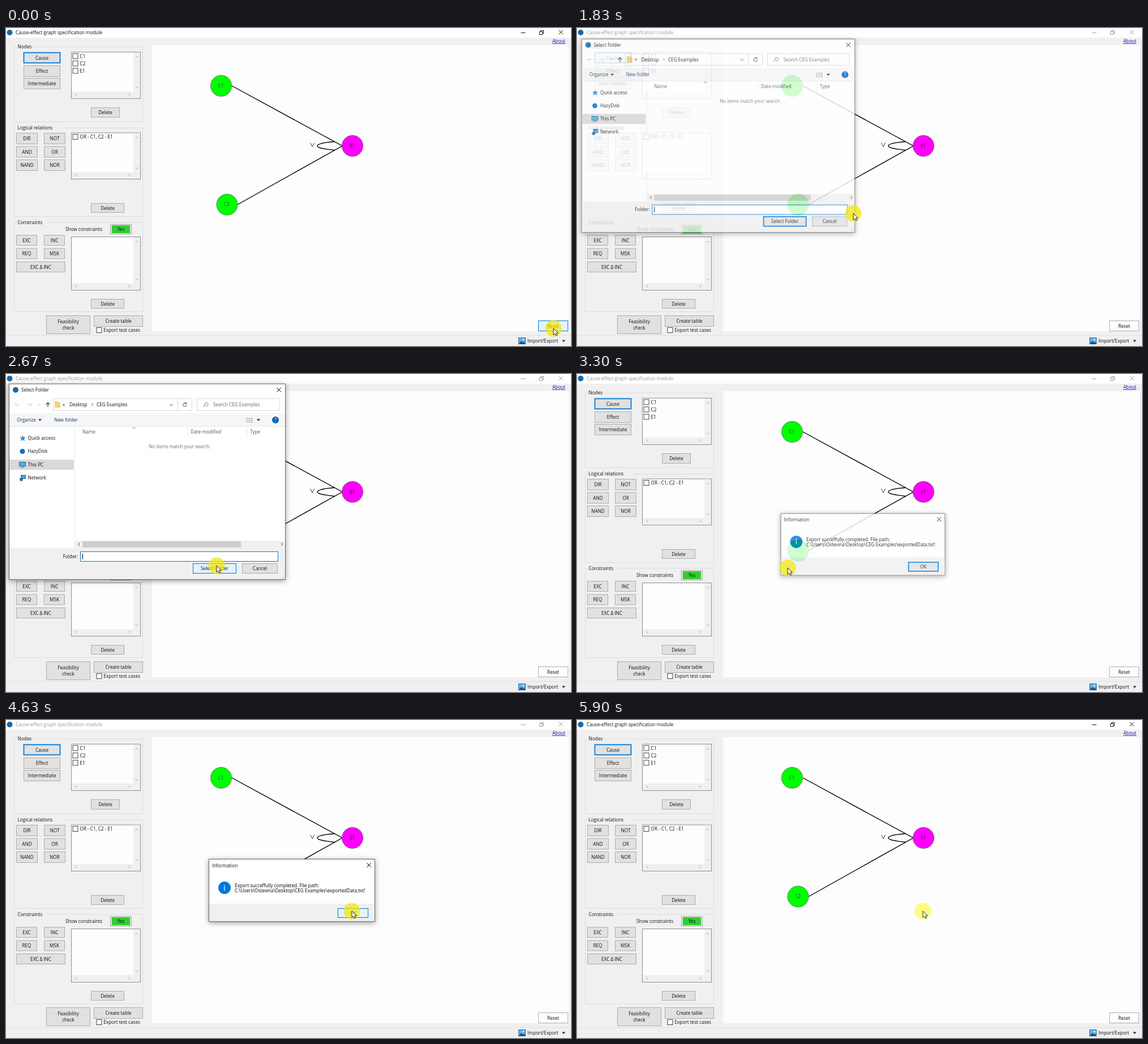
An HTML page that plays this animation: 998 px wide and 561 px high, repeating every 5.96 s.

```html
<!DOCTYPE html>
<html lang="en">
<head>
<meta charset="utf-8">
<title>Cause-effect graph specification module</title>
<style>
html, body { margin: 0; width: 100%; height: 100%; overflow: hidden; background: #f0f0f0; }
svg { display: block; width: 998px; height: 561px; }
text { font: 8.2px "Open Sans", "Noto Sans", sans-serif; white-space: pre; }
.window { transform-box: fill-box; transform-origin: center; filter: drop-shadow(0 2px 5px #0006); }
.button rect { fill: #e1e1e1; stroke: #adadad; }
.button.default rect { stroke: #0078d7; stroke-width: 1.8; }
.button.plain rect { fill: #fdfdfd; }
.button.hover rect { fill: #e5f1fb; stroke: #0078d7; stroke-width: 1; }
.item rect { fill: #f2f2f2; }
.item.hover rect { fill: #0078d7; }
.item.hover text { fill: #fff; }
</style>
</head>
<body>
<svg id="stage" viewBox="0 0 998 561"></svg>
<script>
const LOOP = 5960;
const BLUE = '#0078d7';

// Drawing helpers; boxes are given by their outer corners, text by its middle line.
const rect = (x1, y1, x2, y2, fill, stroke = 'none') => {
  const inset = stroke === 'none' ? 0 : 0.5;
  return `<rect x="${x1 + inset}" y="${y1 + inset}" width="${x2 - x1 - 2 * inset}" height="${y2 - y1 - 2 * inset}" fill="${fill}" stroke="${stroke}"/>`;
};
const text = (x, y, s, fill = '#111', anchor = 'start', extra = '') =>
  `<text x="${x}" y="${y + 3}" fill="${fill}" text-anchor="${anchor}" ${extra}>${s}</text>`;
const line = (d, stroke = '#333', width = 1) =>
  `<path d="${d}" fill="none" stroke="${stroke}" stroke-width="${width}"/>`;
const shape = (d, fill) => `<path d="${d}" fill="${fill}"/>`;
const circle = (x, y, r, fill, stroke = 'none') =>
  `<circle cx="${x}" cy="${y}" r="${r}" fill="${fill}" stroke="${stroke}" stroke-width=".7"/>`;
const group = (id, content, cls = '') => `<g id="${id}" class="${cls}">${content}</g>`;

const button = (x1, y1, x2, y2, label, cls = '', id = '') => {
  const lines = label.split('|');
  const middle = (y1 + y2) / 2 - (lines.length - 1) * 5.5;
  return group(id, rect(x1, y1, x2, y2, '#e1e1e1', '#adadad') +
    lines.map((s, i) => text((x1 + x2) / 2, middle + i * 11, s, '#111', 'middle')).join(''), 'button ' + cls);
};
const chevron = (x, y, dx, dy, size = 2.5, color = '#aaa') => line(dx
  ? `M${x - dx} ${y - size}l${2 * dx} ${size}l${-2 * dx} ${size}`
  : `M${x - size} ${y - dy}l${size} ${2 * dy}l${size} ${-2 * dy}`, color);
const dropArrow = (x, y, color = '#222') => shape(`M${x - 3} ${y - 1.5}h6l-3 3.5z`, color);
const closeMark = (x, y) => line(`M${x - 3.7} ${y - 3.7}l7.4 7.4m0-7.4l-7.4 7.4`, 'currentColor');
const checkItem = (x, y, label) =>
  rect(x, y - 5, x + 10, y + 5, '#fff', '#444') + text(x + 13, y, label);
const listBox = (y1, y2, items = []) =>
  rect(115, y1, 238, y2, '#fdfdfd', '#8b9098') +
  rect(225, y1 + 1, 237, y2 - 1, '#f0f0f0') + rect(116, y2 - 13, 237, y2 - 1, '#f0f0f0') +
  chevron(231, y1 + 9, 0, -1.3) + chevron(231, y2 - 20, 0, 1.3) +
  chevron(124, y2 - 7.5, -1.2, 0) + chevron(218, y2 - 7.5, 1.2, 0) +
  items.map((s, i) => checkItem(117.5, y1 + 7.5 + i * 13, s)).join('');
const groupBox = (y1, y2, label) =>
  rect(14, y1, 242, y2, 'none', '#dedee0') + rect(19, y1 - 4, 23 + label.length * 4.5, y1 + 5, '#f0f0f0') +
  text(20.5, y1, label);
const graphNode = (x, y, label, fill, ink) =>
  circle(x, y, 18.6, fill, '#555') + text(x - .5, y - .5, label, ink, 'middle');

const mainWindow = [
  rect(0, 0, 998, 561, '#f0f0f0'),
  rect(0, 0, 998, 17, '#fff'),
  circle(6.5, 8, 5, '#1769a5'),
  group('titleBar', text(17, 8.3, 'Cause-effect graph specification module', 'currentColor') +
    line('M909.5 8.5h8M942.5 6.5h5v5h-5zM944.5 6v-1.500h5v5h-2', 'currentColor') + closeMark(980, 7.5)),
  text(988, 23, 'About', '#1010c0', 'end', 'text-decoration="underline"'),
  rect(258, 30, 994, 535, '#fdfdfd'),

  groupBox(33, 166, 'Nodes'),
  button(31, 43, 96, 62, 'Cause', 'default'),
  button(31, 66, 96, 86, 'Effect'),
  button(31, 88, 96, 108, 'Intermediate'),
  listBox(42, 125, ['C1', 'C2', 'E1']),
  button(150, 140, 201, 158, 'Delete'),

  groupBox(176, 333, 'Logical relations'),
  ...['DIR', 'NOT', 'AND', 'OR', 'NAND', 'NOR'].map((s, i) => {
    const x = i % 2 ? 67 : 18, y = 185 + (i >> 1) * 23.5;
    return button(x, y, x + 38, y + 20, s);
  }),
  listBox(184.500, 267, ['OR - C1, C2 - E1']),
  button(150, 309, 209, 326, 'Delete'),

  groupBox(342.5, 501, 'Constraints'),
  text(105, 355, 'Show constraints'),
  rect(184, 346, 222, 364, '#e1e1e1', '#adadad') + rect(187, 348, 219, 362, '#32cd32'),
  text(203, 355, 'Yes', '#111', 'middle'),
  ...['EXC', 'INC', 'REQ', 'MSK'].map((s, i) => {
    const x = i % 2 ? 67 : 18, y = 365 + (i >> 1) * 23.5;
    return button(x, y, x + 37, y + 19, s);
  }),
  button(18, 412, 105, 431, 'EXC Δ INC'),
  listBox(368, 463),
  button(150, 478, 209, 495, 'Delete'),
  button(71, 507, 149, 540, 'Feasibility|check'),
  button(155, 507, 242, 527, 'Create table'),
  checkItem(159.5, 533, 'Export test cases'),

  line('M399 102L594 208L409 311.500', '#000', 1.4),
  line('M580 200.500C562 202 550 204.500 550 208S562 213.500 580 215.500', '#000', 1.4),
  line('M537.5 202.500l3.500 7l3.500-7', '#222', .9),
  graphNode(380, 102, 'C1', '#0f0', '#063'),
  graphNode(390.5, 311.5, 'C2', '#0f0', '#063'),
  graphNode(612, 208, 'E1', '#f0f', '#505'),

  button(940, 516, 993, 535, 'Reset', 'plain', 'reset'),
  line('M0 542.500H998', '#e0e0e4'),
  group('arrowGlow', rect(981, 544, 989, 560, '#bfe0fa', '#8cc4ee')),
  rect(905, 546, 918, 558, '#5db5ee', '#356b96'),
  shape('M906 557l4-5l3 3l2-2l2 4z', '#174f7a') + circle(914, 549.5, 1.3, '#fff'),
  text(921, 552, 'Import/Export'),
  dropArrow(985, 552)
].join('');

const menu = rect(903, 509.5, 985, 544, '#f2f2f2', '#aaa') +
  group('importItem', rect(904, 511, 984, 527, '') + text(942, 518.5, 'Import', '#111', 'middle'), 'item') +
  group('exportItem', rect(904, 527, 984, 543, '') + text(942, 535, 'Export', '#111', 'middle'), 'item');

const folderWindow = [
  rect(5, 17, 494, 363, '#fff', '#6a6a6a'),
  circle(17, 28, 5, '#1769a5'),
  text(27, 28, 'Select Folder') + closeMark(482, 28),
  line('M24 54h-8m3-3l-3 3l3 3M37 54h8m-3-3l3 3l-3 3', '#ccc'),
  chevron(59, 54, 0, 1, 2, '#bbb'),
  line('M74 58.500v-8m-3.500 3.500l3.500-3.500l3.500 3.500', '#444', 1.2),
  rect(83, 43, 329, 65, '#fff', '#d9d9d9') + line('M303.5 43v22', '#d9d9d9'),
  shape('M86 48h5l1 1.500h4v10h-10z', '#f7d36b'),
  text(100, 53.5, '«') + text(112, 54, 'Desktop') + chevron(152.5, 54, 1, 0, 2, '#444') + text(160, 54, 'CEG Examples'),
  chevron(292, 54.5, 0, 1.5, 3, '#555'),
  line('M318 51.800a3.200 3.200 0 1 0 1.200 2.500M318.500 49.500v2.800h-2.800', '#444'),
  rect(337, 43, 484, 65, '#fff', '#d9d9d9'),
  line('M348.500 58l2.800-3a3 3 0 1 1 1 1', '#777'),
  text(366, 54, 'Search CEG Examples', '#666'),
  rect(6, 69, 493, 93, '#f5f6f7') + line('M6 92.500H493', '#e8e8ea'),
  text(19, 81, 'Organize', '#1e395b') + dropArrow(60, 81, '#1e395b') + text(85, 81, 'New folder', '#1e395b'),
  line('M424 78.500h3m1 0h3m1 0h4M424 81.500h3m1 0h3m1 0h4M424 84.500h3m1 0h3m1 0h4', '#889'),
  dropArrow(446, 81),
  circle(476, 81, 6, '#0b63b0') + text(476, 81, '?', '#fff', 'middle', 'font-weight="700"'),

  rect(6, 151, 120, 169, '#d9d9d9') + line('M121.500 93V307', '#efefef'),
  shape('M29.500 108l1.500 3.500l4 .3l-3 2.500l1 4l-3.500-2.200l-3.500 2.200l1-4l-3-2.500l4-.3z', '#2f8fdc'),
  circle(29, 136.5, 4.5, '#0a6fc8'),
  rect(23, 155, 35, 163, '#42b4ee', '#24668f') + line('M26 164.500h6', '#24668f'),
  rect(26, 178, 35, 185, '#42a5e5', '#24668f') + circle(27, 186, 3, '#3273a8'),
  ...['Quick access', 'HazyDisk', 'This PC', 'Network'].map((s, i) => text(38.5, 113 + i * 23.4, s)),

  text(135, 102, 'Name', '#555') + text(326, 102, 'Date modified', '#555') + text(431, 102, 'Type', '#555'),
  chevron(226, 95, 0, -1.3, 2.7, '#777') + line('M320.500 94v16M426.500 94v16', '#e8e8e8'),
  text(252, 128, 'No items match your search.', '#6d6d6d'),
  rect(122, 294, 493, 307, '#f0f0f0') + rect(135, 295, 415, 306, '#cdcdcd'),
  chevron(129, 300.5, -1.2, 0, 2.5, '#333') + chevron(487.5, 300.5, 1.2, 0, 2.5, '#333'),
  rect(6, 307, 493, 362, '#f0f0f0'),
  text(127, 322, 'Folder:', '#111', 'end'),
  rect(131, 313, 481, 331, '#fff', BLUE) + line('M135.500 317v10', '#000'),
  button(330, 334, 407, 352, 'Select Folder', 'default', 'select'),
  button(417, 334, 480, 352, 'Cancel'),
  line('M486 359.500h1m1.500 0h1m1.500 0h1M488.500 357h1m1.500 0h1M491 354.500h1', '#aaa')
].join('');

const infoWindow = [
  rect(358, 245, 652, 356, '#fff', '#6a6a6a'),
  text(364, 256.5, 'Information') + closeMark(641, 256),
  circle(386, 296, 11, BLUE),
  text(386, 297.5, 'i', '#fff', 'middle', 'style="font-size:15px"'),
  text(404, 291.5, 'Export succeffully completed. File path:', '#000'),
  text(404, 301, 'C:\\Users\\Ostevina\\Desktop\\CEG Examples\\exportedData.txt!', '#000'),
  rect(359, 324, 651, 355, '#f0f0f0'),
  button(586, 332, 640, 349, 'OK', 'default', 'ok')
].join('');

const pointer = '<circle id="halo" r="14.5"/>' +
  '<path d="M0 0V11.500L2.700 9L4.600 13L6.600 12.100L4.800 8.200H8.300Z" fill="#fff" stroke="#111" stroke-width=".9"/>';

stage.innerHTML = mainWindow + group('menu', menu) + group('folder', folderWindow, 'window') +
  group('info', infoWindow, 'window') + group('pointer', pointer);

const el = id => document.getElementById(id);
const clamp = v => Math.min(1, Math.max(0, v));

// Pointer stops: time, x, y
const path = [
  [0, 967, 530], [150, 967, 530], [600, 985, 551], [1000, 985, 551], [1250, 967, 537],
  [1560, 967, 537], [1830, 488, 327], [2300, 372, 338], [2700, 372, 338], [2900, 372, 342],
  [3500, 372, 342], [4450, 611, 337], [LOOP, 611, 337]
];

function pointerAt(t) {
  const i = path.findIndex(stop => stop[0] > t);
  const [t0, x0, y0] = path[i - 1], [t1, x1, y1] = path[i];
  const u = (t - t0) / (t1 - t0), k = u * u * (3 - 2 * u);
  return [x0 + (x1 - x0) * k, y0 + (y1 - y0) * k];
}

function showWindow(id, t, opens, closes) {
  const shown = (1 - (1 - clamp((t - opens) / 200)) ** 3) * (1 - clamp((t - closes) / 120));
  el(id).style.display = shown ? '' : 'none';
  el(id).style.opacity = shown;
  el(id).style.transform = `scale(${0.94 + 0.06 * shown})`;
}

function draw(t) {
  const [x, y] = pointerAt(t);
  const hover = (id, x1, y1, x2, y2) =>
    el(id).classList.toggle('hover', x >= x1 && x <= x2 && y >= y1 && y <= y2);
  const menuOpen = t >= 730 && t < 1530;

  el('menu').style.display = el('arrowGlow').style.display = menuOpen ? '' : 'none';
  el('titleBar').style.color = t >= 1700 && t < 4780 ? '#999' : '#111';
  hover('reset', 940, 516, 993, 535);
  hover('importItem', 904, 511, 984, 527);
  hover('exportItem', 904, 527, 984, 543);
  hover('select', 330, 334, 407, 352);
  hover('ok', 586, 332, 640, 349);
  showWindow('folder', t, 1746, 2730);
  showWindow('info', t, 3215, 4720);

  el('pointer').setAttribute('transform', `translate(${x} ${y})`);
  el('halo').setAttribute('fill', t < 5000 ? 'rgba(243,231,10,.72)' : 'rgba(255,250,0,.5)');
}

function tick() {
  draw(performance.now() % LOOP);
  requestAnimationFrame(tick);
}
tick();
</script>
</body>
</html>
```
